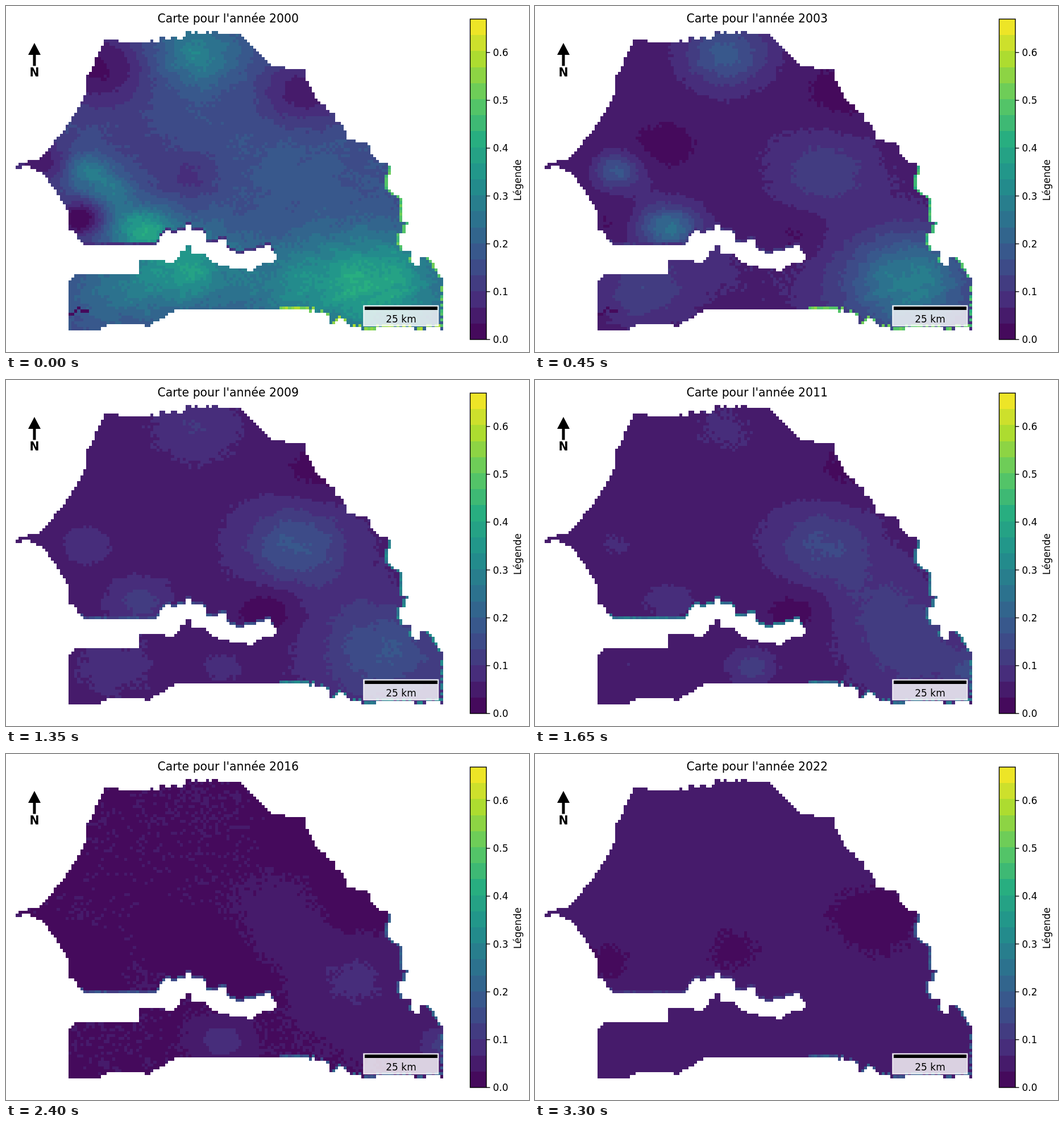
Recreate the animation shown at these times as an HTML page with a canvas. Size 920 by 609 pixels, loop 3.45 s.

```html
<!DOCTYPE html>
<html lang="fr">
<head>
<meta charset="utf-8">
<title>Carte annuelle</title>
<style>
  html, body { margin: 0; width: 100%; height: 100%; overflow: hidden; background: #fff; }
  canvas { display: block; }
</style>
</head>
<body>
<canvas id="stage" width="920" height="609"></canvas>
<script>
const ctx = document.getElementById('stage').getContext('2d');
const STEP = 150, FIRST = 2000, COUNT = 23;
const COLS = 146, ROWS = 102, LEFT = 17.3, TOP = 43.8, CELL_W = 5.152, CELL_H = 5.165;
const BANDS = 20;
const FONT = '"DejaVu Sans", sans-serif';

const north = 'M171 59H196V64H253V59H258V64H268V54H279V59H289V54H302V59H309V54H315V44H325V49' +
  'H330V44H335V49H351V44H356V49H361V44H371V49H412L469 108H484V105H489V111H528';
const east = 'V125L548 168 563 173 564 184 579 188 580 203 595 209 600 235 630 240 641 246V261' +
  'L656 273 671 279 677 287V297L672 300V318L682 330 697 341V377H707V385H702V397L690 402V417' +
  'L702 432 713 434V447L718 452V458H723L728 452V443H741L754 455 769.5 485V571';
const south = 'H764V565H738V571H718V565H651V571H625V565H605L590 550H584V555H580V560H569V544H564' +
  'V539H543V534H540V539H535V534H300L253 562V565H243V560H176V565H166V571H110V488L120 473';
const river = 'H233V447H279V452H294L305 442V430H315V422H325V432L335 437H351L366 452 402 462H423' +
  'V467H433V462L454 452H472V447H477V437L464 430V422H454V427H438V432H420V437H407L392 427 387 412' +
  'H376L361 416H354V400L346 396H325V387H315V396H299V400H289V395H281L263 421H135';
const west = 'L120 397 110 392V362L87 325 63 292 45 287V282H28V287H18V281H23V276H38V271H53L66 263' +
  ' 104 215 125 186 140 152V122H146L171 64Z';
const country = new Path2D(north + east + south + river + west);
const creeks = new Path2D('M110 542H118L128 533 135 537H145M118 388L128 386 138 382');

const anchors = ['#440154', '#472d7b', '#3b528b', '#2c728e', '#21918c',
  '#28ae80', '#5ec962', '#addc30', '#fde725'].map(hex => parseInt(hex.slice(1), 16));

// Each band takes the colour at its middle.
function bandColor(i) {
  const pos = (i + .5) / BANDS * (anchors.length - 1), k = Math.floor(pos);
  return [16, 8, 0].map(shift => {
    const a = anchors[k] >> shift & 255, b = anchors[k + 1] >> shift & 255;
    return Math.round(a + (b - a) * (pos - k));
  });
}
const palette = Array.from({ length: BANDS }, (_, i) => bandColor(i));

const bell = (t, peak, width) => Math.exp(-(((t - peak) / width) ** 2));

function noise(c, r) {
  const n = Math.sin(c * 127.1 + r * 311.7) * 43758.5453;
  return n - Math.floor(n);
}

// Wet and dry spots share a life: strongest in the peak year, gone some years away.
const blob = (x, y, size, gain) => ({ x, y, size, gain });
const phases = [
  { peak: 0, width: 2, blobs: [
    blob(160, 110, 75, -4), blob(525, 150, 60, -3.3), blob(60, 275, 45, -3.3),
    blob(130, 375, 32, -5), blob(320, 300, 45, -2), blob(185, 325, 28, 3),
    blob(310, 460, 70, 6), blob(510, 490, 85, 3.5)] },
  { peak: 1.5, width: 7, blobs: [
    blob(335, 85, 55, 4.2), blob(145, 290, 30, 4), blob(235, 390, 38, 6),
    blob(190, 505, 55, 2.4), blob(230, 245, 45, -1), blob(660, 490, 90, 6.5)] },
  { peak: 7.5, width: 6, blobs: [
    blob(510, 290, 70, 3.8), blob(460, 405, 42, -1.6), blob(545, 165, 60, -1),
    blob(670, 470, 70, 1.5)] },
  { peak: 13.5, width: 3.5, blobs: [
    blob(610, 390, 70, 2.2), blob(380, 505, 30, 3.5), blob(770, 510, 32, 4)] },
  { peak: 20, width: 6, blobs: [
    blob(600, 290, 75, -.8), blob(350, 345, 50, -.6), blob(125, 365, 45, -.6)] }
];

// Country-wide level: a fast fall, then a slow swing.
const baseLevel = t => .75 + 3.8 * Math.exp(-t / 1.5) + .35 * Math.cos((t - 9) * Math.PI / 8);

const midX = c => LEFT + (c + .5) * CELL_W;
const midY = r => TOP + (r + .5) * CELL_H;
const isLand = (c, r) => ctx.isPointInPath(country, midX(c), midY(r));

function borderKind(c, r, x, y) {
  const patch = noise(r + 7, c) < .6;
  if (!isLand(c, r + 1)) {
    if (x > 130 && x < 470 && y > 380 && y < 440) return 'bank';
    if (y > 520 && x > 483 && (x < 540 || patch)) return 'south';
  }
  return !isLand(c + 1, r) && x > 665 && y > 280 && (y < 430 || patch) ? 'east' : '';
}

const borderLevel = {
  bank: t => 2.5 + 6 * bell(t, 12.5, 3),
  east: t => 5 + 9 * bell(t, 0, 9),
  south: t => 5 + 11 * bell(t, 0, 8)
};

ctx.lineWidth = 5;
const cells = [];
for (let r = 0; r < ROWS; r++) {
  for (let c = 0; c < COLS; c++) {
    if (!isLand(c, r)) continue;
    const x = midX(c), y = midY(r);
    cells.push({
      index: (r * COLS + c) * 4,
      border: borderKind(c, r, x, y),
      creek: ctx.isPointInStroke(creeks, x, y),
      grain: noise(c, r) - .5,
      swell: Math.sin(x * .07 + 3 * Math.sin(y * .05)) * Math.cos(y * .08),
      parts: phases.map(p => p.blobs.reduce((sum, b) =>
        sum + b.gain * bell(x, b.x, b.size * 1.3) * bell(y, b.y, b.size), 0))
    });
  }
}

function levelOf(cell, t, base, weights) {
  if (cell.border) return borderLevel[cell.border](t) + cell.grain * 2;
  if (cell.creek && t < 8) return 0;
  const v = cell.parts.reduce((sum, part, i) => sum + part * weights[i], base);
  return v + cell.grain * (.15 + .08 * v) + cell.swell * .06 * v;
}

const grid = document.createElement('canvas');
grid.width = COLS;
grid.height = ROWS;
const gridCtx = grid.getContext('2d');
const pixels = gridCtx.createImageData(COLS, ROWS);

function drawMap(t) {
  const base = baseLevel(t);
  const weights = phases.map(p => bell(t, p.peak, p.width));
  for (const cell of cells) {
    const level = Math.round(levelOf(cell, t, base, weights));
    pixels.data.set(palette[Math.max(0, Math.min(BANDS - 1, level))], cell.index);
    pixels.data[cell.index + 3] = 255;
  }
  gridCtx.putImageData(pixels, 0, 0);
  ctx.imageSmoothingEnabled = false;
  ctx.drawImage(grid, LEFT, TOP, COLS * CELL_W, ROWS * CELL_H);
}

function label(text, x, y, size = 17, align = 'center', weight = '') {
  ctx.font = `${weight} ${size}px ${FONT}`;
  ctx.textAlign = align;
  ctx.fillStyle = '#000';
  ctx.fillText(text, x, y);
}

function drawArrow() {
  ctx.fillStyle = '#000';
  ctx.fill(new Path2D('M50 65L61 86H52.5V105.5H47.5V86H39Z'));
  label('N', 50, 124, 20.4, 'center', 'bold');
}

function drawScale() {
  ctx.fillStyle = ctx.strokeStyle = 'rgba(255,255,255,.8)';
  ctx.lineWidth = 1.7;
  ctx.fillRect(629, 527.5, 131.5, 35.5);
  ctx.strokeRect(629, 527.5, 131.5, 35.5);
  ctx.fillStyle = '#000';
  ctx.fillRect(631, 529, 128, 6);
  label('25 km', 695, 557);
}

function drawLegend() {
  const top = 23, bottom = 587, band = (bottom - top) / BANDS;
  palette.forEach((rgb, i) => {
    const y = Math.round(bottom - (i + 1) * band);
    ctx.fillStyle = `rgb(${rgb})`;
    ctx.fillRect(816, y, 29, Math.round(bottom - i * band) - y);
  });
  ctx.strokeStyle = '#000';
  ctx.lineWidth = 1.4;
  ctx.strokeRect(816.5, top, 28.5, bottom - top);
  for (let i = 0; i <= 6; i++) {
    const y = bottom - i * 84.2;
    ctx.beginPath();
    ctx.moveTo(845, y);
    ctx.lineTo(851.5, y);
    ctx.stroke();
    label((i / 10).toFixed(1), 856.5, y + 6.2, 17, 'left');
  }
  ctx.save();
  ctx.translate(905.5, 306.5);
  ctx.rotate(-Math.PI / 2);
  label('Légende', 0, 0);
  ctx.restore();
}

function draw(t) {
  ctx.fillStyle = '#fff';
  ctx.fillRect(0, 0, 920, 609);
  drawMap(t);
  label("Carte pour l'année " + (FIRST + t), 390.7, 28.5, 20.4);
  drawArrow();
  drawScale();
  drawLegend();
}

const start = performance.now();
let shown = -1;
function tick() {
  const elapsed = Math.max(0, performance.now() - start);
  const t = Math.floor(elapsed / STEP) % COUNT;
  if (t !== shown) draw(shown = t);
  requestAnimationFrame(tick);
}
tick();
</script>
</body>
</html>
```
